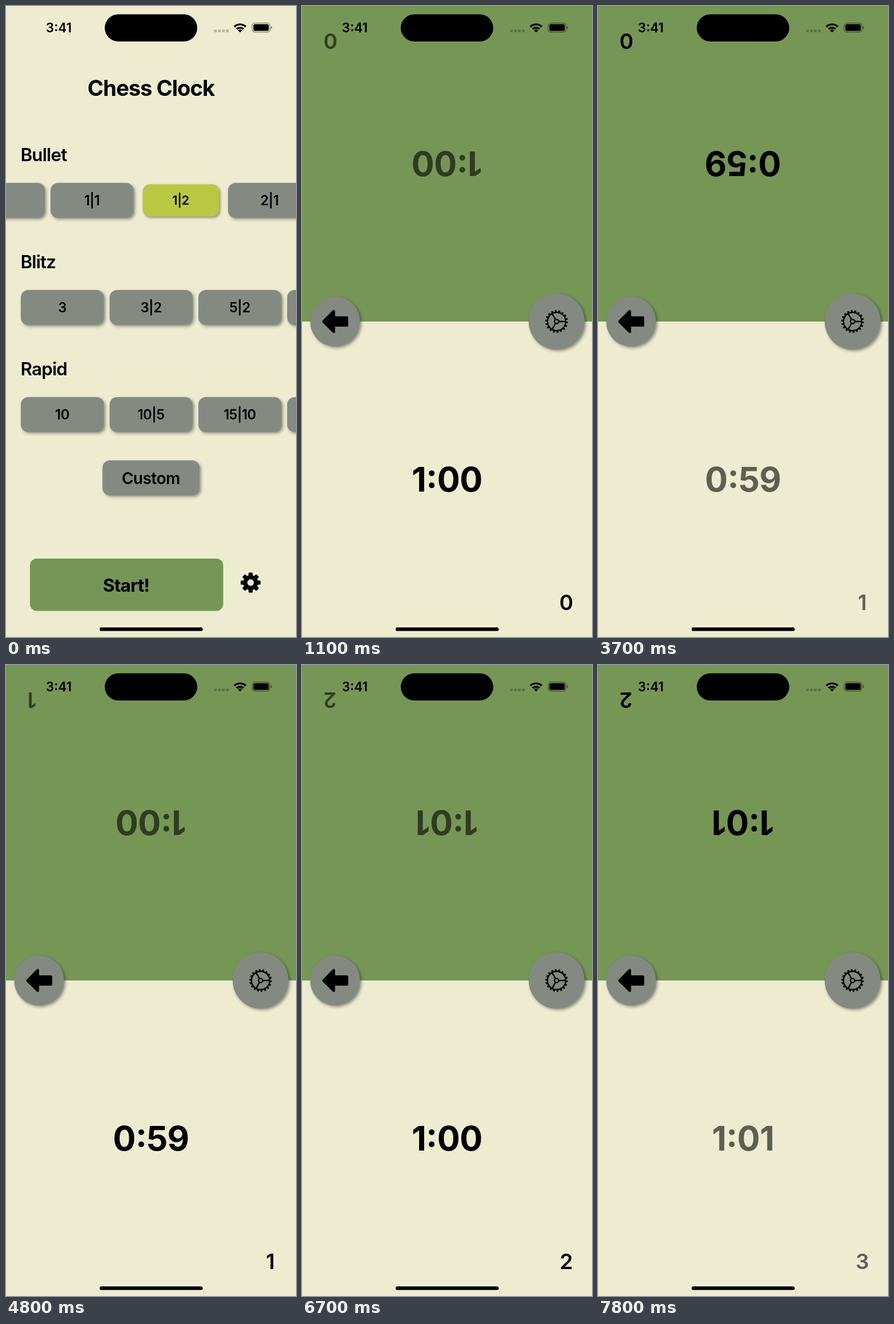
An HTML page that plays this animation: 508 px wide and 1102 px high, repeating every 8 s.

```html
<!DOCTYPE html>
<html lang="en">
<head>
<meta charset="utf-8">
<title>Chess Clock</title>
<style>
  html, body { margin: 0; width: 100%; height: 100%; overflow: hidden; background: #edecd1; }
  svg { display: block; width: 100%; height: 100%; }
  text { font-family: Inter, "Liberation Sans", sans-serif; font-weight: 600; font-optical-sizing: none; }
  .mid { text-anchor: middle; }
  .title { font-size: 38.2px; font-weight: 700; letter-spacing: -.026em; }
  .heading { font-size: 31.4px; letter-spacing: -.027em; }
  .label { font-size: 23.8px; letter-spacing: -.02em; }
  .custom { font-size: 28.2px; letter-spacing: -.022em; }
  .start { font-size: 31.6px; font-weight: 700; letter-spacing: -.027em; }
  .status, .time { font-feature-settings: "case" 1; }
  .status { font-size: 22.5px; }
  .time { font-size: 59.5px; font-weight: 700; letter-spacing: -.01em; }
  .moves { font-size: 37px; }
</style>
</head>
<body>
<svg viewBox="0 0 508 1102" xmlns="http://www.w3.org/2000/svg">
  <defs>
    <filter id="shadow" x="-20%" y="-30%" width="140%" height="160%" color-interpolation-filters="sRGB">
      <feDropShadow dx="2.5" dy="2.5" stdDeviation="2.6" flood-opacity=".4"/>
    </filter>
  </defs>
  <rect width="508" height="1102" fill="#edecd1"/>

  <g id="home">
    <text class="title mid" x="254" y="157">Chess Clock</text>
    <g id="rows"></g>
    <rect x="169" y="793.5" width="170" height="61" rx="13" fill="#848a82" filter="url(#shadow)"/>
    <text class="custom mid" x="253.7" y="834.5">Custom</text>
    <rect x="42" y="965" width="338.5" height="91.5" rx="12" fill="#769656"/>
    <text class="start mid" x="210.5" y="1022.5">Start!</text>
    <path id="cog" transform="translate(428.5 1007)" fill-rule="evenodd" stroke="#000" stroke-width="2" stroke-linejoin="round"/>
  </g>

  <g id="game">
    <rect width="508" height="551" fill="#769656"/>
    <circle cx="58" cy="551" r="43.7" fill="#848a82" filter="url(#shadow)"/>
    <path d="M38 551 55.5 533.5V544.5H78.5V557.5H55.5V568.5Z" stroke="#000" stroke-width="5" stroke-linejoin="round"/>
    <circle cx="446" cy="551" r="49" fill="#848a82" filter="url(#shadow)"/>
    <g transform="translate(446 551)" fill="none" stroke="#000" stroke-width="2.3">
      <circle r="16"/>
      <circle r="18.2" pathLength="36" stroke-dasharray="1 1" stroke-width="3"/>
      <circle r="3.7"/>
      <path id="spokes"/>
    </g>
    <g id="top">
      <text class="time mid" x="254" y="848" transform="rotate(180 254 551)"></text>
      <text class="moves" text-anchor="end" transform="translate(37.5 48) rotate(180)"></text>
    </g>
    <g id="bottom">
      <text class="time mid" x="254" y="848"></text>
      <text class="moves mid" x="463" y="1054.5"></text>
    </g>
  </g>

  <g id="statusbar">
    <text class="status mid" x="92.5" y="46">3:41</text>
    <rect x="173" y="14.5" width="162" height="47.5" rx="23.75"/>
    <path d="M364.5 43.5H391" stroke="#000" stroke-opacity=".24" stroke-width="4.6" stroke-dasharray="4.8 2.2"/>
    <g fill="none" stroke="#000" stroke-width="3.4">
      <path d="M400 36.2a14.4 14.4 0 0 1 20 0"/>
      <path d="M404 40.3a8.6 8.6 0 0 1 12 0"/>
    </g>
    <path d="M410 46.2 406.4 42.6a5.1 5.1 0 0 1 7.2 0Z"/>
    <rect x="431.2" y="29.7" width="31.3" height="16" rx="5" fill="none" stroke="#000" stroke-opacity=".45" stroke-width="1.3"/>
    <rect x="433.3" y="31.8" width="27" height="11.8" rx="3.2"/>
    <path d="M464.2 35.2q2 .7 2 2.5t-2 2.5Z" fill-opacity=".5"/>
  </g>
  <rect x="164" y="1085.2" width="180.6" height="6.4" rx="3.2"/>
</svg>

<script>
const LOOP = 8000;
const byId = id => document.getElementById(id);

// Home screen rows: heading, button top, first button x, labels
const rows = [
  ["Bullet", 309, -77.5, ["", "1|1", "1|2", "2|1"]],
  ["Blitz", 496, 26, ["3", "3|2", "5|2", ""]],
  ["Rapid", 683, 26, ["10", "10|5", "15|10", ""]],
];

function button(label, x, y) {
  const chosen = label === "1|2";
  return `<g ${chosen ? 'id="chosen"' : ""}>
    <rect x="${x}" y="${y}" width="145.5" height="61" rx="13"
      fill="${chosen ? "#b8c843" : "#848a82"}" filter="url(#shadow)"/>
    <text class="label mid" x="${x + 72.5}" y="${y + 39}">${label}</text></g>`;
}

byId("rows").innerHTML = rows.map(([name, y, x, labels]) =>
  `<text class="heading" x="25.5" y="${y - 38.5}">${name}</text>` +
  labels.map((label, i) => button(label, x + i * 155.5, y)).join("")
).join("");

const polar = (r, angle) =>
  `${(r * Math.cos(angle)).toFixed(2)} ${(r * Math.sin(angle)).toFixed(2)}`;

function cogPath(teeth) {
  const step = 2 * Math.PI / teeth;
  const profile = [[12.2, -.3], [16.6, -.19], [16.6, .19], [12.2, .3]];
  const points = [];
  for (let i = 0; i < teeth; i++)
    for (const [r, offset] of profile) points.push(polar(r, (i + offset) * step));
  return `M${points.join("L")}ZM6.8 0A6.8 6.8 0 1 0-6.8 0 6.8 6.8 0 1 0 6.8 0Z`;
}

byId("cog").setAttribute("d", cogPath(8));
byId("spokes").setAttribute("d", [0, 1, 2].map(i => {
  const angle = i * 2 * Math.PI / 3;
  return `M${polar(3.7, angle)}L${polar(16, angle)}`;
}).join(""));

// Start time, active side, seconds left and moves played on each side
const states = [
  [1100, "bottom", 60, 0, 60, 0],
  [1200, "bottom", 60, 0, 59, 0],
  [2100, "bottom", 60, 0, 58, 0],
  [3100, "bottom", 60, 0, 57, 0],
  [3700, "top", 59, 0, 59, 1],
  [4500, "top", 58, 0, 59, 1],
  [4800, "bottom", 60, 1, 59, 1],
  [5600, "bottom", 60, 1, 58, 1],
  [5800, "top", 60, 1, 60, 2],
  [6500, "top", 59, 1, 60, 2],
  [6700, "bottom", 61, 2, 60, 2],
  [7600, "bottom", 61, 2, 59, 2],
  [7800, "top", 61, 2, 61, 3],
];

const clock = s => `${Math.floor(s / 60)}:${String(s % 60).padStart(2, "0")}`;

function showSide(id, active, seconds, moves) {
  const side = byId(id);
  const [time, count] = side.children;
  time.textContent = clock(seconds);
  count.textContent = moves;
  side.setAttribute("opacity", active ? 1 : .6);
}

function releaseScale(t) {
  const held = Math.floor(t / 100) * 100;
  const p = Math.min(1, (held + 120) / 450);
  return .9 + .1 * p * p * (3 - 2 * p);
}

function draw(t) {
  const state = states.findLast(s => t >= s[0]);
  byId("home").style.display = state ? "none" : "";
  byId("game").style.display = state ? "" : "none";
  if (state) {
    const [, active, topTime, topMoves, bottomTime, bottomMoves] = state;
    showSide("top", active === "top", topTime, topMoves);
    showSide("bottom", active === "bottom", bottomTime, bottomMoves);
  } else {
    byId("chosen").setAttribute("transform",
      `translate(306.3 339.5) scale(${releaseScale(t)}) translate(-306.3 -339.5)`);
  }
}

const began = performance.now();
function tick() {
  draw((performance.now() - began) % LOOP);
  requestAnimationFrame(tick);
}
tick();
</script>
</body>
</html>
```
